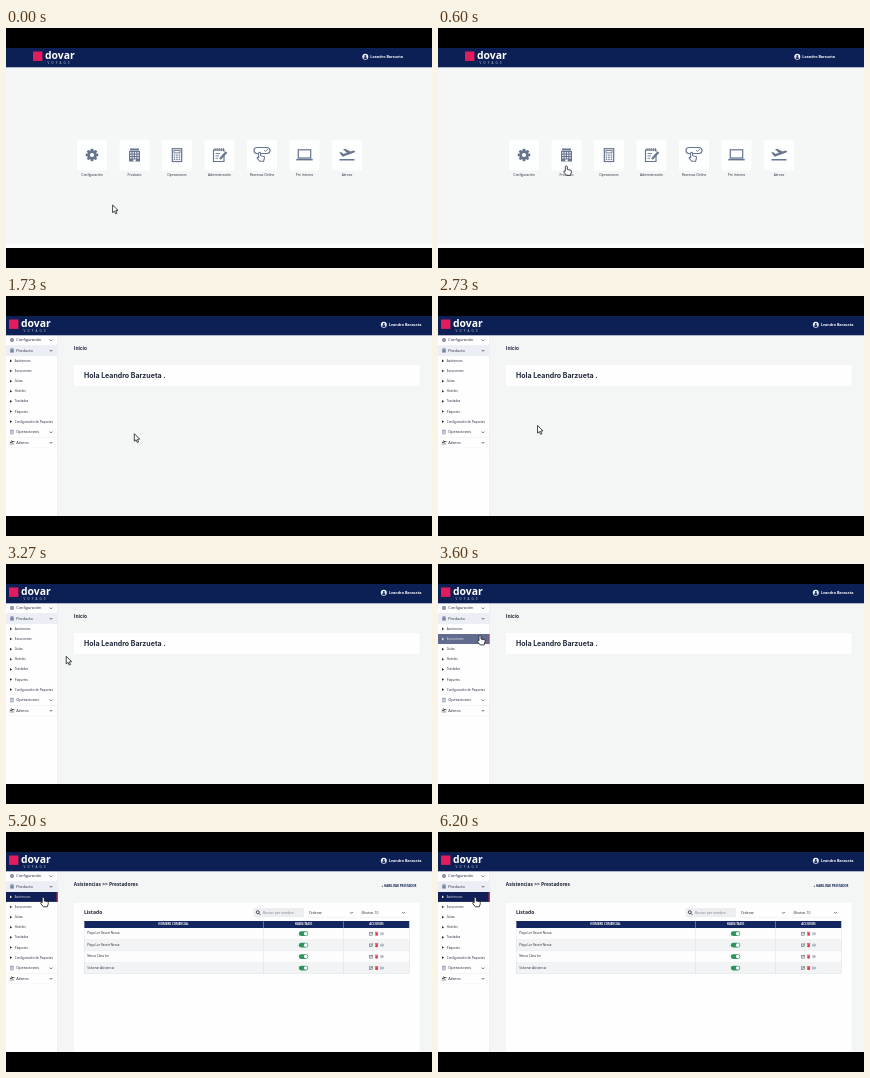
An HTML page with a canvas for the animation above (6.99 s loop, 426 px wide and 240 px high).

```html
<!DOCTYPE html>
<html lang="es">
<head>
<meta charset="utf-8">
<title>Panel de viajes</title>
<style>
html, body { margin: 0; width: 100%; height: 100%; overflow: hidden; background: #000; }
canvas { display: block; width: 100%; height: 100%; }
</style>
</head>
<body>
<canvas id="stage"></canvas>
<script>
const W = 426, H = 240, LOOP = 6990, STEP = 1000 / 15;
const NAVY = '#0d2056', INK = '#20273a', SLATE = '#66748f', PAGE = '#f4f6f6', PINK = '#e51c5c';
const USER = 'Leandro Barzueta';
const canvas = document.getElementById('stage');
const c = canvas.getContext('2d');

const TILES = ['Configuración', 'Producto', 'Operaciones', 'Administración', 'Reservas Online', 'Pre Interno', 'Aéreos'];
const SUBITEMS = ['Asistencias', 'Excursiones', 'Guías', 'Hoteles', 'Traslados', 'Paquetes', 'Configuración de Paquetes'];
const ROWS = ['Playa Lur Resort Nerua', 'Playa Lur Resort Nerua', 'Nerua Clara Inn', 'Solvenar Asistencia'];

// time, x, y of the pointer tip
const PATH = [[0, 106.6, 177], [70, 106.6, 177], [600, 128.3, 137.7], [2400, 128.3, 137.7],
  [2730, 99.8, 129.7], [3070, 74, 109], [3470, 46, 75], [3600, 42, 71.3], [3870, 42, 71.3], [4130, 37.2, 65.2]];

const ramp = (t, a, b) => Math.min(1, Math.max(0, (t - a) / (b - a)));
const ease = u => u * u * (3 - 2 * u);
const easeOut = u => 1 - (1 - u) ** 3;

function pointer(t) {
  const i = PATH.findIndex(p => p[0] > t);
  if (i < 0) return PATH[PATH.length - 1].slice(1);
  const [t0, x0, y0] = PATH[i - 1], [t1, x1, y1] = PATH[i];
  const u = i === 2 ? ease(ramp(t, t0, t1)) : ramp(t, t0, t1);
  return [x0 + (x1 - x0) * u, y0 + (y1 - y0) * u];
}

function rect(x, y, w, h, color) {
  c.fillStyle = color;
  c.fillRect(x, y, w, h);
}

function pill(x, y, w, h, r, color) {
  c.fillStyle = color;
  c.beginPath();
  c.roundRect(x, y, w, h, r);
  c.fill();
}

function dot(x, y, r, color) {
  c.fillStyle = color;
  c.beginPath();
  c.arc(x, y, r, 0, Math.PI * 2);
  c.fill();
}

// y is the vertical middle of the lowercase line
function text(s, x, y, size, { color = INK, weight = 400, align = 'left', family = 'Open Sans', spacing = 0 } = {}) {
  c.font = `${weight} ${size}px "${family}", sans-serif`;
  c.textAlign = align;
  c.textBaseline = 'alphabetic';
  c.letterSpacing = spacing + 'px';
  c.fillStyle = color;
  c.fillText(s, x, y + size * 0.33);
}

function line(points, color, width = 1, close = false) {
  c.beginPath();
  points.forEach(([x, y]) => c.lineTo(x, y));
  if (close) c.closePath();
  c.strokeStyle = color;
  c.lineWidth = width;
  c.stroke();
}

function shape(points, color) {
  c.beginPath();
  points.forEach(([x, y]) => c.lineTo(x, y));
  c.closePath();
  c.fillStyle = color;
  c.fill();
}

function at(x, y, scale, draw) {
  c.save();
  c.translate(x, y);
  c.scale(scale, scale);
  draw();
  c.restore();
}

function frame(x, y, w, h, color = SLATE, width = 1.1) {
  c.strokeStyle = color;
  c.lineWidth = width;
  c.strokeRect(x, y, w, h);
}

function gear(color = SLATE, hole = '#fff') {
  for (let i = 0; i < 8; i++) {
    c.save();
    c.rotate(i * Math.PI / 4);
    rect(-1.4, -6.2, 2.8, 4, color);
    c.restore();
  }
  dot(0, 0, 4.7, color);
  dot(0, 0, 2.1, hole);
}

function building(color = SLATE) {
  rect(-4.5, -6.5, 9, 2, color);
  rect(-5.5, -4, 11, 10.5, color);
  for (let r = 0; r < 3; r++)
    for (let k = 0; k < 4; k++) rect(-4.3 + k * 2.4, -2.9 + r * 2.5, 1.3, 1.4, '#fff');
  rect(-1.2, 4.4, 2.4, 2.1, '#fff');
}

function calculator(color = SLATE) {
  frame(-4.7, -6.3, 9.4, 12.8, color, 1.2);
  frame(-3, -4.5, 6, 2.4, color, 0.9);
  for (let r = 0; r < 3; r++)
    for (let k = 0; k < 3; k++) rect(-3.3 + k * 2.5, -0.5 + r * 2.1, 1.5, 1.2, color);
}

function notepad() {
  line([[4.5, 0], [4.5, 6.5], [-6, 6.5], [-6, -5], [4.5, -5], [4.5, -3.5]], SLATE, 1.2);
  for (let i = 0; i < 5; i++) rect(-5 + i * 2.1, -7, 1, 3, SLATE);
  for (let i = 0; i < 3; i++) rect(-4, -2 + i * 2.4, 4.5 - i, 0.9, SLATE);
  line([[0.5, 4], [7, -3]], SLATE, 2.2);
}

function booking() {
  c.strokeStyle = SLATE;
  c.lineWidth = 1.1;
  c.beginPath();
  c.roundRect(-8, -7.5, 16, 6, 3);
  c.stroke();
  line([[2, -4.8], [3.5, -3.6], [6, -6]], SLATE, 0.9);
  at(-2.4, -2.8, 0.95, () => handShape('#fff', SLATE, 1.1));
}

function laptop() {
  frame(-6.2, -5.2, 12.4, 8.2, SLATE, 1.2);
  rect(-8.2, 3.8, 16.4, 1.6, SLATE);
}

function plane(color = SLATE) {
  shape([[-7.5, -2.4], [-6, -3], [-3.5, -1], [0, -2.2], [-4, -5.8], [-2, -6.2], [3.6, -3.6], [6.5, -4.6], [8.2, -3.8], [7.3, -2.5], [-4.5, 1.8]], color);
  rect(-7.5, 4, 15, 1.5, color);
}

function handShape(fill, stroke, width) {
  c.beginPath();
  c.moveTo(-1, 5.5);
  c.lineTo(-1, 0.8);
  c.quadraticCurveTo(0, -0.7, 1, 0.8);
  c.lineTo(1, 3.7);
  c.lineTo(4.6, 4.6);
  c.quadraticCurveTo(5.4, 5, 5.1, 6.3);
  c.lineTo(4.2, 9.6);
  c.lineTo(0.2, 9.6);
  c.lineTo(-2.7, 6.1);
  c.quadraticCurveTo(-2.5, 4.8, -1, 5.5);
  c.closePath();
  c.fillStyle = fill;
  c.fill();
  c.strokeStyle = stroke;
  c.lineWidth = width;
  c.stroke();
}

function arrow() {
  const pts = [[0, 0], [0, 7.6], [1.8, 6.1], [3, 8.8], [4.3, 8.2], [3.1, 5.6], [5.4, 5.4]];
  shape(pts, '#fff');
  line(pts, '#16181c', 0.8, true);
}

const TILE_ICONS = [gear, building, calculator, notepad, booking, laptop, plane];

function logo(x, alpha = 1) {
  c.globalAlpha = alpha;
  rect(x, 23.5, 9.4, 9.4, PINK);
  text('dovar', x + 12, 28, 10.4, { color: '#fff', weight: 700 });
  text('VOYAGE', x + 14.4, 34.6, 3, { color: '#c3cbe0', spacing: 2.2 });
  c.globalAlpha = 1;
}

function header(x) {
  rect(0, 20, W, 19.3, NAVY);
  dot(x, 28.8, 3, '#f2f4f8');
  dot(x, 27.9, 1, NAVY);
  pill(x - 1.7, 29.3, 3.4, 1.6, 0.8, NAVY);
  text(USER, x + 5, 28.5, 3.7, { color: '#fff', weight: 700 });
}

function home() {
  rect(0, 20, W, 200, '#f5f7f7');
  rect(0, 216, W, 4, '#fbfcfc');
  header(359.3);
  logo(27);
  TILES.forEach((name, i) => {
    const x = 86 + i * 42.5;
    pill(x - 15, 112, 30, 30.5, 1, '#fdfefe');
    at(x, 127, 1, () => TILE_ICONS[i]());
    text(name, x, 146.6, 3.3, { align: 'center' });
  });
}

function chevron(x, y, size = 1.2) {
  line([[x - size, y - size / 2], [x, y + size / 2], [x + size, y - size / 2]], '#333a4a', 0.8);
}

function menuRow(name, y, icon) {
  at(6, y - 0.2, 0.31, icon);
  text(name, 10.2, y, 3.9);
  chevron(45, y);
  rect(0, y + 5, 51.5, 0.4, '#e4e6ea');
}

function hoverLevels(t) {
  return [ramp(t, 3930, 4130),
    ramp(t, 3440, 3640) * (1 - ramp(t, 3930, 4130)),
    0.7 * ramp(t, 3330, 3400) * (1 - ramp(t, 3440, 3600))];
}

function sidebar(t) {
  const open = ease(ramp(t, 1400, 1730)), gap = 71 * open, levels = hoverLevels(t);
  rect(0, 39.3, 51.5, 180.7, '#fefefe');
  rect(51.5, 39.3, 0.6, 180.7, '#e2e5e8');
  if (open > 0) rect(0, 49.5, 51.5, 10.3, `rgba(236,238,245,${open})`);
  menuRow('Configuración', 44.2, () => gear('#59647c', '#fff'));
  menuRow('Producto', 54.7, () => building('#52628c'));
  c.save();
  c.beginPath();
  c.rect(0, 60, 52.2, gap);
  c.clip();
  SUBITEMS.forEach((name, i) => {
    const y = 64.9 + i * 10.12, level = levels[i] || 0;
    if (level > 0) {
      c.globalAlpha = level * (i === 1 ? 0.82 : 1);
      rect(0, y - 5, 51, 10, '#101f55');
      rect(50.6, y - 5, 1.4, 10, PINK);
      c.globalAlpha = 1;
    }
    const color = level > 0.45 ? '#e9ebf5' : INK;
    shape([[4, y - 1.3], [6.1, y], [4, y + 1.3]], color);
    text(name, 8.8, y, 3.05, { color });
  });
  c.restore();
  menuRow('Operaciones', 65.2 + gap, () => calculator('#52628c'));
  menuRow('Aéreos', 75.7 + gap, () => plane('#15181f'));
}

function welcome() {
  text('Inicio', 67.8, 52.8, 4.8, { weight: 700 });
  rect(68, 69, 345.5, 21, '#fefefe');
  text(`Hola ${USER} .`, 78, 79.6, 7, { weight: 700, family: 'Inter' });
}

function rowIcons(y) {
  frame(363.6, y - 1.2, 2.6, 2.7, '#606a7c', 0.6);
  line([[364.6, y + 0.4], [367, y - 1.7]], '#606a7c', 0.7);
  rect(369.3, y - 1, 2.6, 2.9, '#df3847');
  rect(368.9, y - 1.9, 3.4, 0.7, '#df3847');
  c.strokeStyle = '#7c8798';
  c.lineWidth = 0.6;
  c.beginPath();
  c.ellipse(376, y, 1.7, 1.1, 0, 0, Math.PI * 2);
  c.stroke();
  dot(376, y, 0.5, '#7c8798');
}

function listing(t) {
  const u = ramp(t, 4560, 5130);
  c.save();
  c.globalAlpha = ease(u);
  c.translate(0, 20 * (1 - easeOut(u)));
  text('Asistencias >> Prestadores', 67.8, 52.8, 4.85, { weight: 700 });
  text('+ HABILITAR PRESTADOR', 410.5, 54, 2.9, { weight: 700, align: 'right', color: NAVY });
  rect(68, 71, 345.5, 149, '#fefefe');
  text('Listado', 78, 80.8, 5, { weight: 700 });

  rect(247.5, 76, 50.5, 9.2, '#eceef0');
  c.strokeStyle = INK;
  c.lineWidth = 0.8;
  c.beginPath();
  c.arc(251.8, 80.2, 1.5, 0, Math.PI * 2);
  c.stroke();
  line([[252.9, 81.3], [254.4, 82.8]], INK, 0.8);
  text('Buscar por nombre', 257, 80.7, 3.4, { color: '#777e8a' });
  text('Ordenar', 303, 80.6, 3.3);
  text('Mostrar 10', 355.5, 80.6, 3.3);
  chevron(345.5, 80.8);
  chevron(397.5, 80.8);
  rect(301, 85, 49, 0.4, '#dfe2e6');
  rect(354, 85, 48, 0.4, '#dfe2e6');

  rect(78, 89, 325.3, 7, '#14265f');
  [['NOMBRE COMERCIAL', 167.5], ['HABILITADO', 297.5], ['ACCIONES', 370.5]].forEach(([s, x]) =>
    text(s, x, 92.4, 2.9, { color: '#fff', weight: 700, align: 'center' }));
  ROWS.forEach((name, i) => {
    const y = 101.7 + i * 11.45;
    rect(78, y - 5.7, 325.3, 11.45, i % 2 ? '#f2f3f4' : '#fdfdfd');
    rect(78, y + 5.5, 325.3, 0.4, '#dde0e4');
    text(name, 81.3, y - 0.2, 3);
    pill(292.8, y - 2.4, 9.4, 4.8, 2.4, '#2d955c');
    dot(299.7, y, 1.8, '#fff');
    rowIcons(y);
  });
  [78, 257.4, 337.5, 403].forEach(x => rect(x, 89, 0.4, 52.8, '#d5d9e0'));
  c.restore();
}

function panel(t) {
  rect(0, 20, W, 200, PAGE);
  if (t < 4595) welcome();
  else listing(t);
  sidebar(t);
  header(377.8);
  logo(3, ramp(t, 1400, 1600));
}

function draw(t) {
  const scale = canvas.width / W;
  c.setTransform(scale, 0, 0, canvas.height / H, 0, 0);
  rect(0, 0, W, H, '#000');
  const atHome = t < 1395;
  if (atHome) home();
  else panel(t);
  const [x, y] = pointer(t);
  const overLink = atHome ? y < 142 : x < 51;
  at(x, y, 1, () => overLink ? handShape('#fff', '#16181c', 0.8) : arrow());
}

function resize() {
  const ratio = window.devicePixelRatio || 1;
  canvas.width = Math.round(innerWidth * ratio);
  canvas.height = Math.round(innerHeight * ratio);
}

function tick() {
  const t = performance.now() % LOOP;
  draw(Math.floor((t + 4) / STEP) * STEP);
  requestAnimationFrame(tick);
}

addEventListener('resize', resize);
resize();
tick();
</script>
</body>
</html>
```
